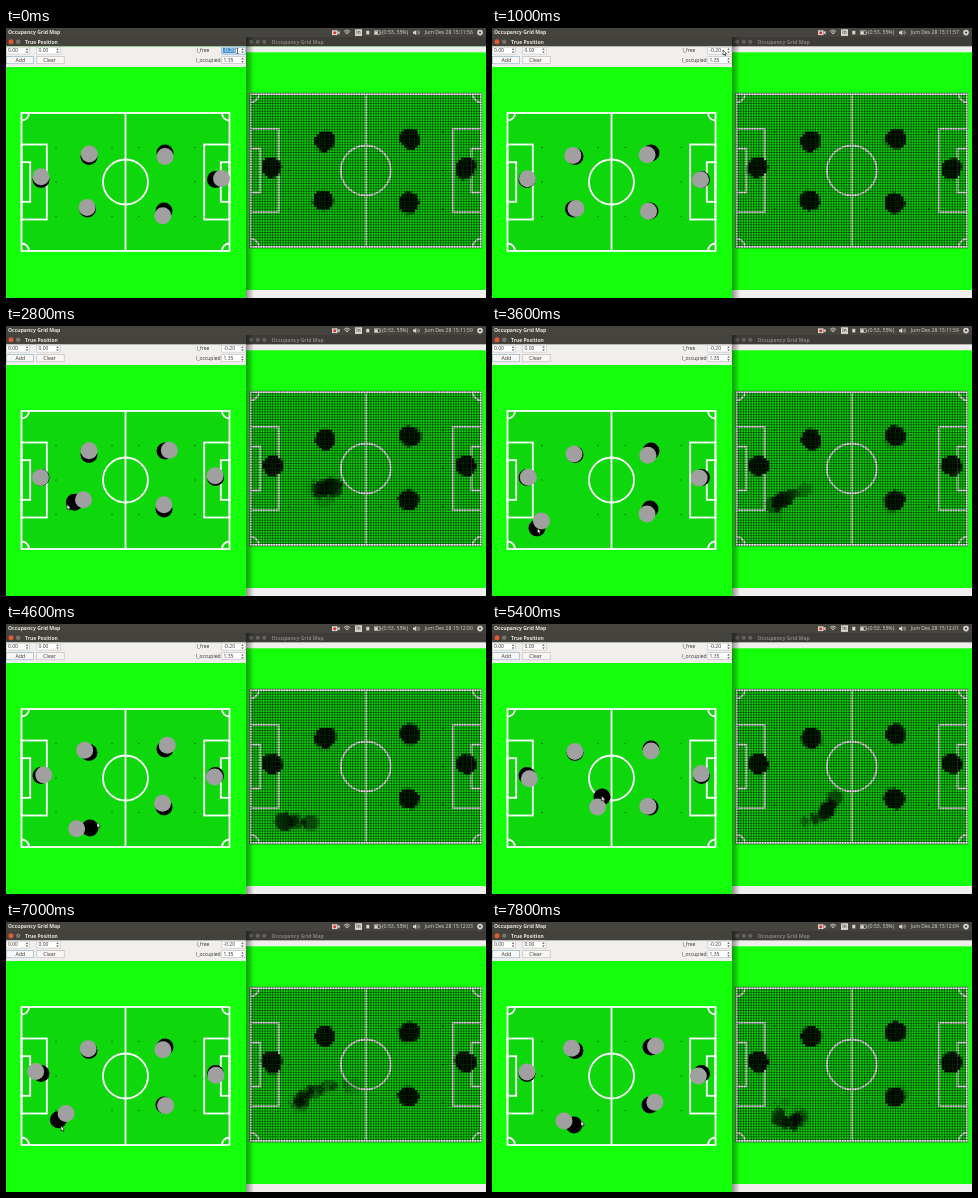
These frames come from a looping animation (480 px wide and 270 px high, 8 s). An HTML page with a canvas:

```html
<!DOCTYPE html>
<html lang="en">
<head>
<meta charset="utf-8">
<title>Occupancy Grid Map</title>
<style>
html, body { margin: 0; width: 100%; height: 100%; overflow: hidden; background: #14ff0a; }
canvas { display: block; width: 480px; height: 270px; }
</style>
</head>
<body>
<canvas id="stage" width="480" height="270"></canvas>
<script>
const ctx = document.getElementById('stage').getContext('2d');
const LOOP = 8000, STEP = 200, STEPS = LOOP / STEP;
const SCANS = 5;      // sensor readings per step
const LAG = 0.18;     // seconds the sensor trails the robot
const LEAD = 0.2;     // seconds the pointer leads the robot
const TYPING_END = 1, GRAB = 1.8;
const FONT = '"Open Sans", "Noto Sans", sans-serif';
const GREEN = '#14ff0a', R = 8.5;

// Field on the left, and its enlarged copy on the right
const F = { x: 15.5, y: 85, w: 208, h: 138 };
const MAP = { x: 244.5, y: 66, k: 1.109 };
const GRID = { x: 243.6, y: 65.2, p: 2.58, cols: 90, rows: 60 };

const parked = [[35, 151.5], [83, 128.5], [159, 125], [209.5, 151.5], [158, 183]];

// Key points of the drag: seconds, x, y
const drag = [
  [1.85, 81.5, 181], [2, 94, 170], [2.4, 86, 169], [2.9, 64, 178], [3.3, 52, 184],
  [3.6, 45, 202], [4.1, 46, 205], [4.6, 84, 204], [5, 98, 195], [5.4, 110, 173],
  [6, 109, 173], [6.4, 78, 173], [6.9, 51, 194], [7.2, 55, 205], [7.8, 82, 203], [8, 89, 200]
];

let seed = 29;
function random() {
  seed = (seed * 16807) % 2147483647;
  return seed / 2147483647;
}
const noise = () => (random() + random() + random() - 1.5) * 4.6;
const mix = (a, b, k) => a + (b - a) * k;
const smooth = k => k * k * (3 - 2 * k);

function dragged(t) {
  const next = drag.findIndex(key => key[0] > t);
  if (next === 0) return drag[0].slice(1);
  if (next < 0) return drag[drag.length - 1].slice(1);
  const [t0, x0, y0] = drag[next - 1], [t1, x1, y1] = drag[next];
  const k = (t - t0) / (t1 - t0);
  return [mix(x0, x1, k), mix(y0, y1, k)];
}

const robots = (t, lag = 0) => [...parked, dragged(t - lag)];
const sense = t => robots(t, LAG).map(([x, y]) => [x + noise(), y + noise()]);

// Occupancy rises where a robot is sensed and decays elsewhere
function simulate() {
  const cells = new Float32Array(GRID.cols * GRID.rows);
  const frames = [];
  for (let scan = -60; scan <= (STEPS - 1) * SCANS; scan++) {
    const seen = sense(scan * STEP / SCANS / 1000);
    for (let i = 0; i < cells.length; i++) cells[i] = Math.max(0, cells[i] - 0.04);
    for (const [x, y] of seen) stamp(cells, x, y);
    if (scan >= 0 && scan % SCANS === 0) frames.push({ seen, cells: cells.slice() });
  }
  return frames;
}

function stamp(cells, x, y) {
  const cx = (MAP.x + (x - F.x) * MAP.k - GRID.x) / GRID.p - 0.5;
  const cy = (MAP.y + (y - F.y) * MAP.k - GRID.y) / GRID.p - 0.5;
  const r = (R - 0.9) * MAP.k / GRID.p;
  for (let row = Math.max(0, Math.ceil(cy - r)); row <= Math.min(GRID.rows - 1, cy + r); row++)
    for (let col = Math.max(0, Math.ceil(cx - r)); col <= Math.min(GRID.cols - 1, cx + r); col++)
      if (Math.hypot(col - cx, row - cy) <= r) {
        const i = row * GRID.cols + col;
        cells[i] = Math.min(1, cells[i] + 0.2);
      }
}

function box(x, y, w, h, fill, edge) {
  ctx.fillStyle = fill;
  ctx.fillRect(x, y, w, h);
  if (edge) {
    ctx.strokeStyle = edge;
    ctx.lineWidth = 0.6;
    ctx.strokeRect(x + 0.3, y + 0.3, w - 0.6, h - 0.6);
  }
}

function disc(x, y, r, fill) {
  ctx.fillStyle = fill;
  ctx.beginPath();
  ctx.arc(x, y, r, 0, 7);
  ctx.fill();
}

function arc(x, y, r, from, to) {
  ctx.beginPath();
  ctx.arc(x, y, r, from, to);
  ctx.stroke();
}

function label(text, x, y, size, fill, weight = 400) {
  ctx.font = `${weight} ${size}px ${FONT}`;
  ctx.fillStyle = fill;
  ctx.fillText(text, x, y);
}

function poly(points, fill, edge) {
  ctx.beginPath();
  points.forEach(([x, y]) => ctx.lineTo(x, y));
  ctx.closePath();
  ctx.fillStyle = fill;
  ctx.fill();
  if (edge) {
    ctx.strokeStyle = edge;
    ctx.lineWidth = 0.6;
    ctx.stroke();
  }
}

function field(line) {
  const { x, y, w, h } = F, right = x + w, bottom = y + h;
  const midX = x + w / 2, midY = y + h / 2;
  box(x, y, w, h, '#0ed80c');
  ctx.strokeStyle = line;
  ctx.lineWidth = 1.8;
  ctx.strokeRect(x, y, w, h);
  for (const [depth, half] of [[25.3, 37.5], [8.7, 19.8]]) {
    ctx.strokeRect(x, midY - half, depth, 2 * half);
    ctx.strokeRect(right - depth, midY - half, depth, 2 * half);
  }
  ctx.beginPath();
  ctx.moveTo(midX, y);
  ctx.lineTo(midX, bottom);
  ctx.stroke();
  arc(midX, midY, 22.5, 0, 7);
  [[x, y], [right, y], [right, bottom], [x, bottom]].forEach(([cx, cy], i) => {
    arc(cx, cy, 7.5, i * Math.PI / 2, (i + 1) * Math.PI / 2);
  });
  for (const dx of [-69.5, -13.5, 13.5, 69.5])
    for (const dy of [-34.5, 34.5]) disc(midX + dx, midY + dy, 0.7, '#065a06');
  for (const dx of [-69.5, 69.5]) disc(midX + dx, midY, 0.7, '#065a06');
}

function spin(x, y, text, active) {
  box(x, y, 24, 7.6, '#fff', active ? '#4a90c8' : '#b8b4ae');
  if (active) box(x + 1.2, y + 1.2, 13, 5.2, '#4a90c8');
  label(text, x + 2, y + 5.6, 5, active ? '#fff' : '#333');
  const ax = x + 21;
  poly([[ax - 1.3, y + 3], [ax + 1.3, y + 3], [ax, y + 1.5]], '#444');
  poly([[ax - 1.3, y + 4.8], [ax + 1.3, y + 4.8], [ax, y + 6.3]], '#444');
}

function button(x, text, tx, edge) {
  box(x, 28.3, 28, 7.8, '#f8f7f6', edge);
  label(text, tx, 34, 5.2, '#333');
}

function clock(t) {
  const s = 56 + Math.floor(t + 0.3);
  const two = n => String(n).padStart(2, '0');
  return `Jum Des 28 15:${11 + Math.floor(s / 60)}:${two(s % 60)}`;
}

function panel(t) {
  const dark = '#45443f', ink = '#dad6ce';
  box(0, 0, 480, 9, dark);
  label('Occupancy Grid Map', 2, 6.4, 5.1, '#e8e4dc', 700);
  box(326, 2.3, 5.5, 4.8, ink);
  poly([[331.5, 4.2], [333.6, 2.8], [333.6, 6.6], [331.5, 5.2]], ink);
  disc(328.7, 4.7, 1.5, '#d8362c');
  ctx.strokeStyle = ink;
  ctx.lineWidth = 0.8;
  for (const r of [1.6, 3.2, 4.8]) arc(341, 7, r, -2.3, -0.84);
  box(349, 1.3, 7, 6.6, ink);
  label('In', 350.3, 6.3, 4.6, dark, 600);
  box(360.3, 2.8, 3, 3.6, ink);
  box(368, 2.5, 6.4, 4.4, dark, ink);
  box(374.4, 3.9, 0.8, 1.6, ink);
  box(368.8, 3.3, 3, 2.8, ink);
  label('(0:53, 55%)', 376, 6.4, 5.2, ink);
  poly([[407, 3.6], [408.3, 3.6], [410.3, 1.9], [410.3, 7.3], [408.3, 5.7], [407, 5.7]], ink);
  for (const r of [1.7, 3]) arc(410.4, 4.6, r, -0.8, 0.8);
  label(clock(t), 418.7, 6.4, 5.1, ink);
  disc(474, 4.6, 2.8, ink);
  disc(474, 4.6, 1.1, dark);
}

function gridWindow(cells) {
  box(240, 9, 240, 9.5, '#3d3c38');
  for (const x of [245.2, 251.8, 258.3]) disc(x, 13.8, 2.1, '#65635c');
  label('Occupancy Grid Map', 265.5, 15.7, 5.1, '#85827a', 700);
  box(240, 18.5, 240, 251.5, '#f1efed');
  box(240, 24.3, 240, 237.7, GREEN);

  ctx.save();
  ctx.translate(MAP.x, MAP.y);
  ctx.scale(MAP.k, MAP.k);
  ctx.translate(-F.x, -F.y);
  field('#f4f4f4');
  ctx.restore();

  const { x, y, p, cols, rows } = GRID;
  cells.forEach((v, i) => {
    if (v < 0.03) return;
    ctx.fillStyle = `rgba(0,0,0,${smooth(v) * 0.97})`;
    ctx.fillRect(x + (i % cols) * p, y + Math.floor(i / cols) * p, p, p);
  });
  ctx.fillStyle = 'rgba(0,0,0,0.5)';
  for (let c = 0; c <= cols; c++) ctx.fillRect(x + c * p - 0.45, y, 0.9, rows * p);
  for (let r = 0; r <= rows; r++) ctx.fillRect(x, y + r * p - 0.45, cols * p, 0.9);

  const shadow = ctx.createLinearGradient(240, 0, 248, 0);
  shadow.addColorStop(0, 'rgba(0,0,0,0.4)');
  shadow.addColorStop(1, 'rgba(0,0,0,0)');
  box(240, 9, 8, 261, shadow);
}

function positionWindow(t, seen) {
  box(0, 9, 240, 9.5, '#43423d');
  disc(5, 13.8, 2.5, '#e2592f');
  disc(12.2, 13.8, 2.3, '#77746c');
  label('True Position', 19, 15.7, 5, '#e8e4dc', 700);
  box(0, 18.5, 240, 20.5, '#f1efed');
  spin(0, 18.8, '0.00');
  spin(30.5, 18.8, '0.00');
  button(0, 'Add', 9.5, '#7fa9c4');
  button(30.5, 'Clear', 37.3, '#b8b4ae');
  label('l_free', 190.5, 24.3, 5, '#333');
  label('l_occupied', 190, 34, 5, '#333');
  spin(215.5, 18.8, '-0.20', t < TYPING_END);
  spin(215.5, 28.4, '1.35');
  box(0, 39, 240, 231, GREEN);
  field('#fff');
  for (const [x, y] of robots(t)) disc(x, y, R, '#000');
  for (const [x, y] of seen) disc(x, y, R, '#a0a0a0');
}

function pointer(t) {
  if (t < TYPING_END) {
    box(231, 20.5, 0.7, 5, '#222');
    for (const y of [20.2, 25.3]) box(230.2, y, 2.3, 0.5, '#222');
    return;
  }
  const k = smooth(Math.min(1, (t - TYPING_END) / (GRAB - TYPING_END)));
  const [px, py] = dragged(t + LEAD);
  const x = mix(231, px, k), y = mix(23, py, k) - 1;
  const shape = [[0, 0], [0, 5], [1.2, 4], [2, 5.8], [2.9, 5.4], [2.1, 3.7], [3.6, 3.6]];
  poly(shape.map(([dx, dy]) => [x + dx, y + dy]), '#fff', '#111');
}

const frames = simulate();
let shown = -1;

function draw(step) {
  const { seen, cells } = frames[step], t = step * STEP / 1000;
  gridWindow(cells);
  positionWindow(t, seen);
  panel(t);
  pointer(t);
}

const start = performance.now();
function tick() {
  const step = Math.floor(((performance.now() - start) % LOOP) / STEP);
  if (step !== shown) draw(shown = step);
  requestAnimationFrame(tick);
}
tick();
</script>
</body>
</html>
```
